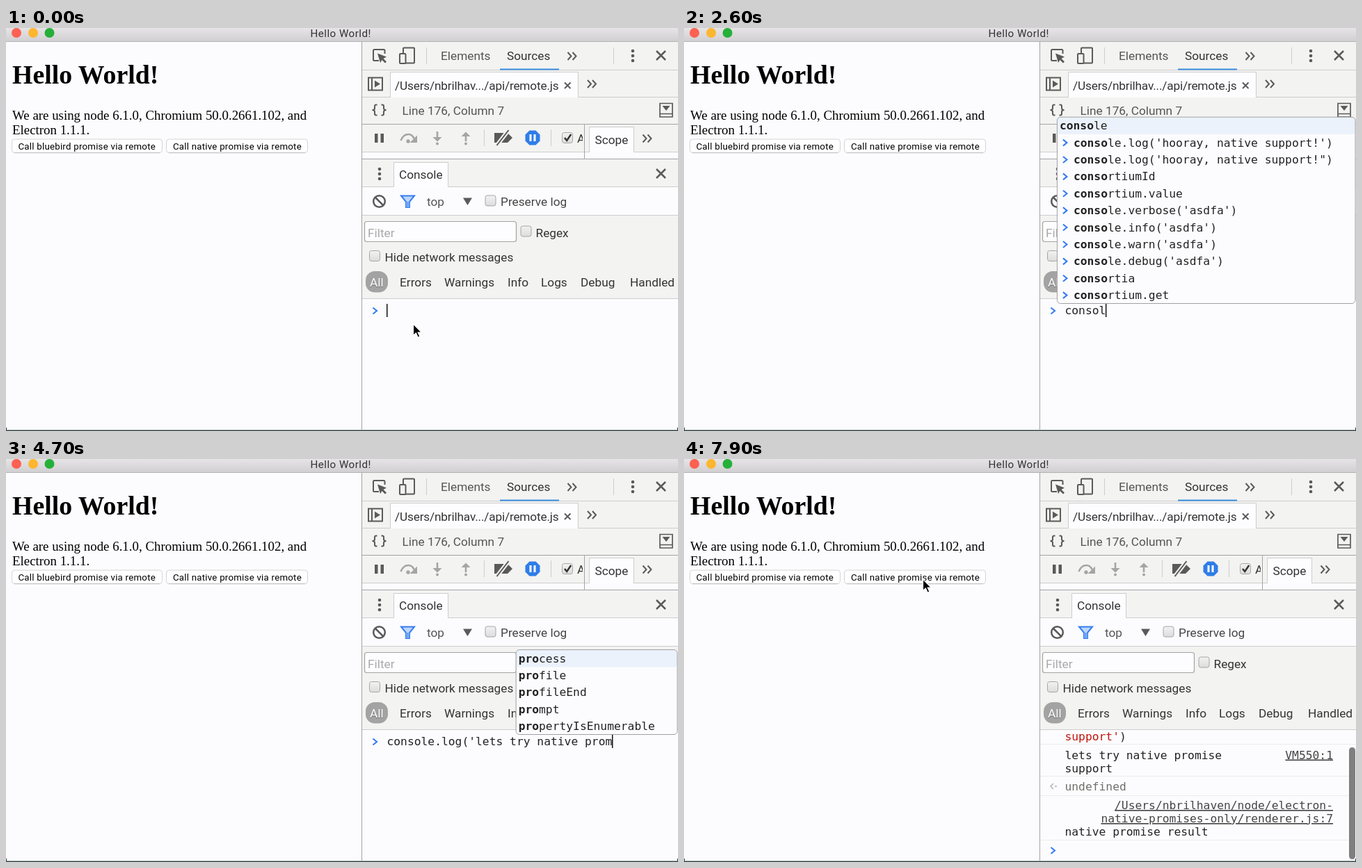
These frames come from a looping animation (966x580 px, 8000 ms). An HTML page:

```html
<!DOCTYPE html>
<html lang="en">
<head>
<meta charset="utf-8">
<title>Hello World!</title>
<style>
  html, body { margin: 0; width: 100%; height: 100%; overflow: hidden; background: #fcfcfe; }
  svg { display: block; width: 966px; height: 580px; }
  text { white-space: pre; }
  .ui { font: 17.25px Roboto, "Open Sans", sans-serif; fill: #333; }
  .path { letter-spacing: -.18px; }
  .btn { font: 13.3px Roboto, sans-serif; letter-spacing: .22px; fill: #000; }
  .title { font: 15.2px Roboto, sans-serif; letter-spacing: .45px; fill: #333; }
  .page { font: 18.89px "Liberation Serif", "Times New Roman", serif; fill: #000; }
  .page .h1 { font-size: 37.8px; font-weight: bold; }
  .mono { font: 16.31px "DejaVu Sans Mono", Menlo, monospace; fill: #222; }
  .bold { font-weight: bold; }
  .str { fill: #c0140c; }
  .link { fill: #444; text-decoration: underline; text-anchor: end; }
  .dim { fill: #6e6e6a; }
  .bar { fill: #f3f3f1; }
  .rule { stroke: #cdcdd0; fill: none; }
  .edge { stroke: #a3a3a6; fill: none; }
  .faint { stroke: #ececf0; fill: none; }
  .tab { fill: #fdfdff; stroke: #cdcdd0; }
  .icon { stroke: #5a5a5a; stroke-width: 2; fill: none; }
  .thick { stroke-width: 2.5; }
  .thin { stroke-width: 1.7; }
  .solid { fill: #5a5a5a; }
  .off { stroke: #a5a5a5; stroke-width: 2.6; fill: none; }
  .offFill { fill: #a5a5a5; }
  .prompt { stroke: #367cf1; stroke-width: 2.1; fill: none; }
  .old { stroke: #8a8a8a; stroke-width: 1.6; fill: none; }
</style>
</head>
<body>
<svg viewBox="0 0 966 580">
  <defs>
    <linearGradient id="chrome" x2="0" y2="1">
      <stop stop-color="#e6e4e6"/><stop offset="1" stop-color="#d0ced0"/>
    </linearGradient>
    <linearGradient id="boxFill" x2="0" y2="1">
      <stop stop-color="#f2f2f2"/><stop offset="1" stop-color="#dcdcdc"/>
    </linearGradient>
    <clipPath id="log"><rect x="512" y="390" width="454" height="188"/></clipPath>
    <clipPath id="tools"><rect x="512" y="139" width="317" height="40"/></clipPath>
    <path id="more" class="icon" d="M0 0l5 5.5l-5 5.5M7 0l5 5.5l-5 5.5"/>
    <path id="close" class="icon thick" d="M0 0l13 13M13 0l-13 13"/>
    <g id="dots" class="solid"><circle r="2.3"/><circle cy="7" r="2.3"/><circle cy="14" r="2.3"/></g>
    <rect id="box" x=".5" y=".5" width="15" height="15" rx="3" fill="url(#boxFill)" stroke="#a6a6a6"/>
    <path id="chev" d="M0 0l5.5 4.5l-5.5 4.5"/>
  </defs>

  <rect width="966" height="580" fill="#fcfcfe"/>

  <!-- page -->
  <g class="page">
    <text class="h1" x="9" y="80">Hello World!</text>
    <text x="9" y="132">We are using node 6.1.0, Chromium 50.0.2661.102, and</text>
    <text x="9" y="153">Electron 1.1.1.</text>
  </g>
  <g fill="#fff" stroke="#d4d4d6">
    <rect x="8.5" y="160" width="216" height="19.5" rx="4"/>
    <rect x="230.5" y="160" width="203" height="19.5" rx="4"/>
  </g>
  <path d="M12 179.7H221M234 179.7H430" stroke="#bcbcbe"/>
  <g class="btn">
    <text x="17.5" y="174.8">Call bluebird promise via remote</text>
    <text x="240" y="174.8">Call native promise via remote</text>
  </g>

  <!-- developer tools -->
  <path class="bar" d="M512 20H966V178H512ZM512 189H966V229H512ZM512 269H966V389H512Z"/>
  <path class="rule" d="M512 60.5H966M512 99.5H966M512 178.5H966M512 228.5H966M512 269.5H966M512 389.5H966"/>
  <path class="edge" d="M511.5 20V578M512 138.5H966M512 188.5H966"/>
  <path class="rule" d="M604.5 28V52M873.5 28V52M687.5 146V170M783.5 146V170"/>

  <g class="icon">
    <path d="M536 47H529.5Q528 47 528 45.5V32.5Q528 31 529.5 31H543Q544.5 31 544.5 32.5V37"/>
    <path class="solid" stroke="none" d="M534 36.5L547 41.5L542.5 44L547 48.5L545 50.5L540.5 46L538 50Z"/>
    <rect x="571" y="28.5" width="16" height="22" rx="1"/>
    <rect x="566" y="37" width="8.5" height="14" rx="1" fill="#f3f3f1"/>
  </g>
  <g class="ui">
    <text x="625" y="46" fill="#555">Elements</text>
    <text x="720" y="46">Sources</text>
  </g>
  <rect x="710" y="58.5" width="85" height="2" fill="#3b8de0"/>
  <use href="#more" x="807.5" y="35"/>
  <use href="#dots" x="901" y="33"/>
  <use href="#close" x="935" y="33"/>

  <path class="tab" d="M552.5 99.5V63.5H822.5V99.5"/>
  <rect x="553" y="98" width="269" height="2" fill="#fdfdff"/>
  <path class="icon" d="M521 71.5H541V89.5H521ZM526 71.5V89.5"/>
  <path class="solid" d="M530 75.5L538 80.5L530 85.5Z"/>
  <text class="ui path" x="559" y="89">/Users/nbrilhav.../api/remote.js</text>
  <path class="icon" d="M803 78.5l8.5 8.5M811.5 78.5l-8.5 8.5"/>
  <use href="#more" x="836" y="75"/>

  <path class="icon" d="M533.5 110.5H532Q530 110.5 530 112.5V115.5Q530 118 526.5 118Q530 118 530 120.5V123.5Q530 125.5 532 125.5H533.5M539.5 110.5H541Q543 110.5 543 112.5V115.5Q543 118 546.5 118Q543 118 543 120.5V123.5Q543 125.5 541 125.5H539.5"/>
  <text class="ui" x="569.5" y="125" style="fill:#555">Line 176, Column 7</text>
  <path class="icon thin" d="M940 108.5H958V128H940ZM940 123.5H958"/>
  <path class="solid" d="M943.5 112H954.5L949 119Z"/>

  <g clip-path="url(#tools)">
    <path class="solid" d="M530 152h4.5v13h-4.5zM538.5 152h4.5v13h-4.5z"/>
    <path class="off" d="M567.5 162Q571 153 578.5 153Q584 153 586.5 159"/>
    <path class="offFill" d="M591 154.5V165H580.5ZM620 163.5l-6.5-6.5h13zM661 149.5l-6.5 6.5h13z"/>
    <circle class="offFill" cx="578" cy="163" r="2.7"/>
    <path class="off" d="M620 149V158M661 155V163"/>
    <circle class="offFill" cx="620" cy="166.5" r="2"/><circle class="offFill" cx="661" cy="166.5" r="2"/>
    <path class="solid" d="M702 151H721L728 158L721 165H702Z"/>
    <path d="M705.5 169L722.5 147" stroke="#f3f3f1" stroke-width="6"/>
    <path class="icon" d="M705.5 169L722.5 147"/>
    <path d="M752.5 147.5H761.5L767.5 153.5V162.5L761.5 168.5H752.5L746.5 162.5V153.5Z" fill="#2f7de8"/>
    <path d="M752.5 153h3v10h-3zM758.5 153h3v10h-3z" fill="#fff"/>
    <use href="#box" x="799" y="150"/>
    <path class="icon thick" d="M803 158l3.2 4l6-9" style="stroke:#333"/>
    <text class="ui" x="821" y="165">A</text>
  </g>
  <path class="edge" d="M831.5 139V188"/>
  <path class="tab" d="M838.5 178.5V142.5H902.5V178.5"/>
  <rect x="839" y="177" width="63" height="2" fill="#fdfdff"/>
  <text class="ui" x="846.5" y="167">Scope</text>
  <use href="#more" x="915.5" y="153.5"/>

  <path class="tab" d="M557.5 228.5V193.5H635.5V228.5"/>
  <rect x="558" y="227" width="77" height="2" fill="#fdfdff"/>
  <use href="#dots" x="537" y="203"/>
  <text class="ui" x="565" y="217">Console</text>
  <use href="#close" x="935" y="203"/>

  <g class="icon thick"><circle cx="536.5" cy="249.5" r="8.3"/><path d="M530.5 243.5l12 12"/></g>
  <path d="M568 241.5H587L580 250V258H575V250Z" fill="#bcd6fa" stroke="#367cf1" stroke-width="2"/>
  <path d="M575 250H580V258H575Z" fill="#6ea5f4"/>
  <path class="solid" d="M657 244.5H670L663.5 255Z"/>
  <use href="#box" x="688.5" y="240.5"/>
  <rect x="515.5" y="278.5" width="218" height="29" rx="3" fill="#fdfdff" stroke="#a4a4a4" stroke-width="1.2"/>
  <use href="#box" x="739.5" y="284.5"/>
  <use href="#box" x="522" y="320"/>
  <rect x="517" y="350" width="32" height="30.5" rx="13" fill="#a3a3a3"/>
  <g class="ui">
    <text x="605" y="255.5" style="fill:#555">top</text>
    <text x="711" y="255.5" style="fill:#444">Preserve log</text>
    <text x="520" y="300.5" style="fill:#a9a9a9">Filter</text>
    <text x="761.5" y="300.5">Regex</text>
    <text x="544.5" y="336">Hide network messages</text>
    <text x="523" y="372" style="fill:#fff;text-shadow:0 1px 1px #666">All</text>
    <text x="566" y="372">Errors</text><text x="630" y="372">Warnings</text>
    <text x="721" y="372">Info</text><text x="769" y="372">Logs</text>
    <text x="826" y="372">Debug</text><text x="897" y="372">Handled</text>
  </g>

  <!-- console body -->
  <g class="mono" clip-path="url(#log)">
    <g id="input">
      <use href="#chev" class="prompt" x="527.5" y="402.5"/>
      <text id="line1" x="547.5" y="412"></text>
      <text id="line2" x="547.5" y="431"></text>
    </g>
    <g id="output">
      <use href="#chev" class="old" x="527.5" y="403"/>
      <text x="547.5" y="412">console.log(<tspan class="str">'lets try native promise</tspan></text>
      <text x="547.5" y="431"><tspan class="str">support'</tspan>)</text>
      <path class="faint" d="M512 436.5H966M512 482.5H966M512 510.5H966"/>
      <text x="547.5" y="457.5">lets try native promise</text>
      <text x="547.5" y="476.5">support</text>
      <text class="link" x="933" y="457.5">VM550:1</text>
      <path d="M531 493l-4 4l4 4" stroke="#b5b5b5" stroke-width="1.6" fill="none"/>
      <circle cx="534.5" cy="497" r="1.3" fill="#b5b5b5"/>
      <text class="dim" x="547.5" y="502.5">undefined</text>
      <g id="result">
        <text class="link" x="933" y="530">/Users/nbrilhaven/node/electron-</text>
        <text class="link" x="933" y="549">native-promises-only/renderer.js:7</text>
        <text x="547.5" y="568">native promise result</text>
        <path class="faint" d="M512 574.5H966"/>
      </g>
      <use id="next" href="#chev" class="prompt" x="527.5" y="521"/>
    </g>
    <rect id="caret" width="1.5" height="19" fill="#111"/>
    <rect id="thumb" x="956" y="415" width="9" height="161" rx="4.5" fill="#7f7f7f"/>
  </g>
  <g id="popup" class="mono"></g>

  <!-- window frame -->
  <rect width="966" height="20" fill="url(#chrome)"/>
  <path d="M0 19.5H966" stroke="#b4b2b4"/>
  <circle cx="15" cy="7" r="7" fill="#fc6152"/>
  <circle cx="39" cy="7" r="7" fill="#fdb630"/>
  <circle cx="62.5" cy="7" r="7" fill="#25b03a"/>
  <text class="title" x="437.5" y="13">Hello World!</text>
  <path d="M0 578.5H966" stroke="#a5aaac"/>
  <path d="M0 579.5H966M.5 575V580M965.5 575V580" stroke="#2c4240"/>

  <path id="arrow" d="M0 0V16.5L3.9 13L6.7 19.3L9.4 18.1L6.7 12H11.8Z" fill="#000" stroke="#fff" stroke-width="1.2"/>
  <path id="beam" d="M-3.5 -9Q0 -9 0 -6.5Q0 -9 3.5 -9M0 -7V7M-3.5 9Q0 9 0 6.5Q0 9 3.5 9M-2 3H2" fill="none" stroke="#111" stroke-width="1.3"/>
</svg>
<script>
  const LOOP = 8000, STEP = 100, CHAR = 9.818, LEFT = 547.5, ROW = 24.39;
  const COMMAND = "console.log('lets try native promise support')";
  const BREAK = COMMAND.indexOf('support'), FIT = 41;
  const START = 1800, ENTER = 6000, CLICK = 7500, RESULT = 7600;

  const WORDS = ['confirm', 'console', 'constructor', 'continue', 'copy',
    'process', 'profile', 'profileEnd', 'prompt', 'propertyIsEnumerable'];
  const HISTORY = ["console.log('hooray, native support!')", "console.log('hooray, native support!\")",
    'consortiumId', 'consortium.value', "console.verbose('asdfa')", "console.info('asdfa')",
    "console.warn('asdfa')", "console.debug('asdfa')", 'consortia', 'consortium.get'];

  // [time, characters typed] and [time, x, y]
  const KEYS = [[START, 0], [2200, 3], [3600, 16], [4600, 32], [4700, 33], [5200, 39], [5800, 46]];
  const MOUSE = [[6200, 585.5, 426], [6800, 325, 124], [7200, 343.5, 173]];

  const $ = id => document.getElementById(id);
  const show = (id, on) => $(id).setAttribute('visibility', on ? 'visible' : 'hidden');
  const smooth = u => u * u * (3 - 2 * u);

  function track(points, t, ease = u => u) {
    if (t <= points[0][0]) return points[0].slice(1);
    for (let i = 1; i < points.length; i++) {
      const [a, ...from] = points[i - 1], [b, ...to] = points[i];
      if (t <= b) return from.map((v, k) => v + (to[k] - v) * ease((t - a) / (b - a)));
    }
    return points[points.length - 1].slice(1);
  }

  const typed = t => COMMAND.slice(0, Math.floor(track(KEYS, t)[0] + 1e-6));

  const entry = (x, y, s, n) =>
    `<text x="${x}" y="${y}"><tspan class="bold">${s.slice(0, n)}</tspan>${s.slice(n)}</text>`;

  // Suggestions hang above the input line and never pass its right margin.
  function popup(text) {
    const word = text.match(/\w*$/)[0];
    const words = word.length > 1 ? WORDS.filter(w => w.startsWith(word) && w !== word) : [];
    const past = text.length > 1 ? HISTORY.filter(h => h.startsWith(text)) : [];
    const count = words.length + past.length;
    if (!count) return '';

    const width = Math.max(...words.map(w => w.length * CHAR), ...past.map(h => h.length * CHAR + 20));
    const x = Math.min(LEFT + (text.length - word.length) * CHAR, 933 - width);
    const top = 396.5 - count * ROW, w = width + 35.5;
    let html = `<rect x="${x - 3.5}" y="${top}" width="${w}" height="${count * ROW}" rx="5" fill="#fcfcfe"/>
      <rect x="${x - 3}" y="${top + .5}" width="${w - 1}" height="${ROW}" rx="4" fill="#ebf2fc"/>`;
    words.forEach((s, i) => html += entry(x, top + i * ROW + 18, s, word.length));
    past.forEach((s, i) => {
      const y = top + (words.length + i) * ROW;
      html += `<use href="#chev" class="prompt" x="${x + 5}" y="${y + 8}"/>` + entry(x + 20, y + 18, s, text.length);
    });
    return html + `<rect x="${x - 3.5}" y="${top}" width="${w}" height="${count * ROW}" rx="5" fill="none" stroke="#a0a0a3"/>`;
  }

  function drawConsole(t) {
    const done = t >= ENTER, result = t >= RESULT;
    const text = done ? '' : typed(t);
    const cut = text.length > FIT ? BREAK : text.length;
    $('line1').textContent = text.slice(0, cut);
    $('line2').textContent = text.slice(cut);
    $('popup').innerHTML = done ? '' : popup(typed(t - STEP));

    show('input', !done);
    show('output', done);
    show('result', result);
    show('thumb', result);
    $('output').setAttribute('transform', `translate(0 ${result ? -26 : 0})`);
    $('next').setAttribute('y', result ? 585 : 521);

    const wrapped = cut < text.length;
    const column = wrapped ? text.length - cut : text.length;
    const idle = t < START || done;
    $('caret').setAttribute('x', LEFT - .5 + column * CHAR);
    $('caret').setAttribute('y', done ? 516 : wrapped ? 416 : 397);
    show('caret', t < CLICK && (!idle || t % 1000 < 500));
  }

  function drawMouse(t) {
    const visible = t < START || t >= MOUSE[0][0];
    const [x, y] = track(MOUSE, t, smooth);
    const overText = x < 434 && y > 115 && y < 158;
    show('arrow', visible && !overText);
    show('beam', visible && overText);
    for (const id of ['arrow', 'beam']) $(id).setAttribute('transform', `translate(${x} ${y})`);
  }

  const origin = performance.now();
  let last = -1;
  function frame() {
    const t = Math.floor((performance.now() - origin) % LOOP / STEP) * STEP;
    if (t !== last) {
      drawConsole(t);
      drawMouse(t);
      last = t;
    }
    requestAnimationFrame(frame);
  }
  frame();
</script>
</body>
</html>
```
